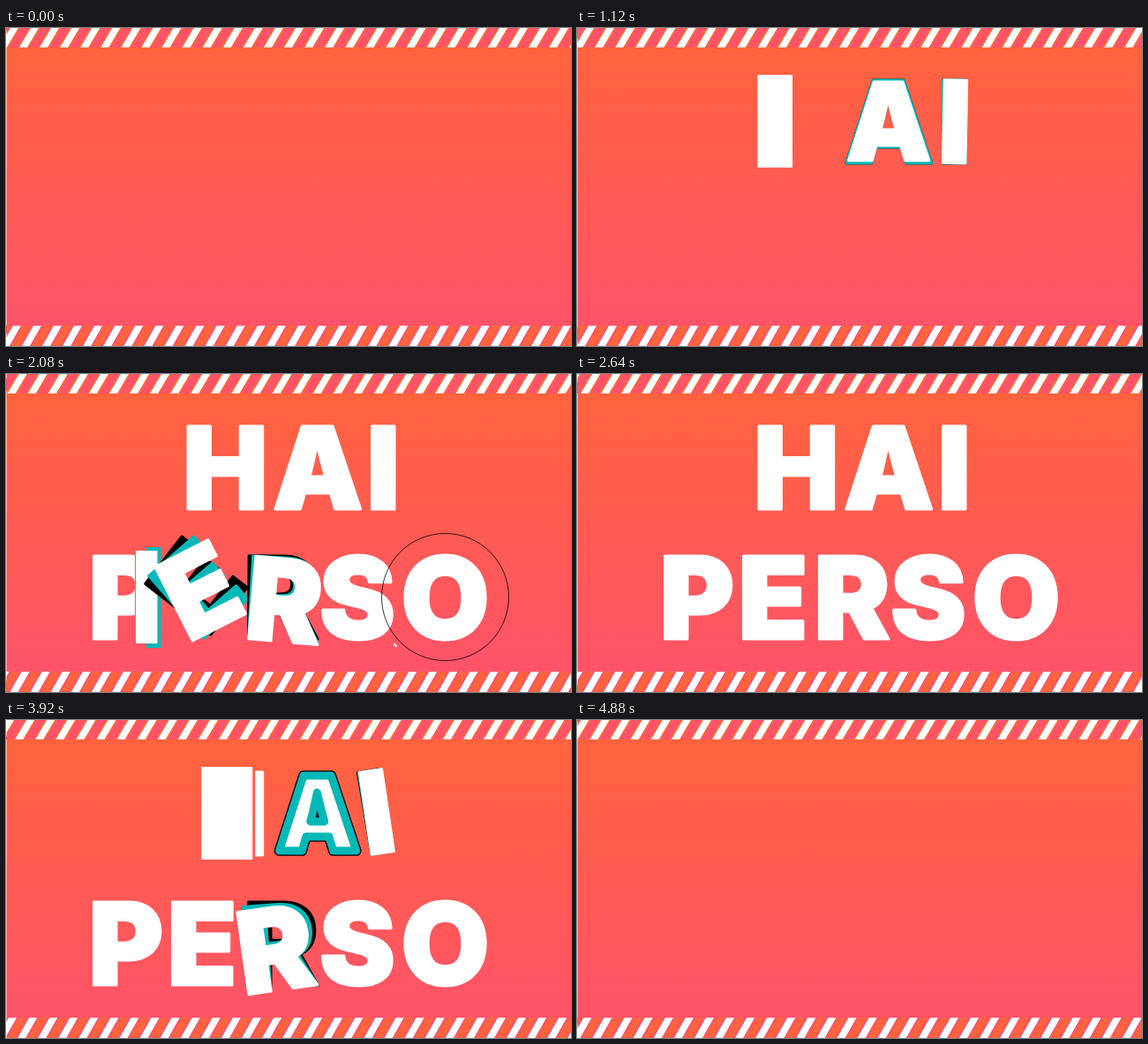
An HTML page with a canvas that plays this animation: 640 px wide and 360 px high, repeating every 4.96 s.

```html
<!DOCTYPE html>
<html lang="en">
<head>
<meta charset="utf-8">
<title>HAI PERSO</title>
<style>
  html, body { margin: 0; width: 100%; height: 100%; overflow: hidden; background: #ff5c50; }
  canvas { display: block; width: 640px; height: 360px; }
</style>
</head>
<body>
<canvas id="stage" width="640" height="360"></canvas>
<script>
const ctx = document.getElementById('stage').getContext('2d');
const LOOP = 4960, STEP = 80;
const BLACK = '#000', TEAL = '#05b8b8', WHITE = '#fff';
const ORANGE = '#ff643a', PINK = '#ff526c';
const COLORS = [BLACK, TEAL, WHITE];
const CAP = 97, EDGE = 3;

// Eased value at time t through pairs of time, value.
function key(t, ...k) {
  if (t <= k[0]) return k[1];
  for (let i = 2; i < k.length; i += 2) {
    if (t < k[i]) {
      const u = (t - k[i - 2]) / (k[i] - k[i - 2]);
      return k[i - 1] + (k[i + 1] - k[i - 1]) * u * u * (3 - 2 * u);
    }
  }
  return k[k.length - 1];
}

// x: centre, px/py: pivot from the middle of the baseline, outX: pivot on leaving,
// lag/trail: delay between layers on entering and turning,
// sway: turn per layer after its entrance, turn: turn on the main clock.
const letters = [
  { ch: 'H', x: 248.5, base: 154, start: 760, exit: 3680, wipe: true },
  { ch: 'A', x: 353, base: 154, start: 400, exit: 3840, lag: 240, py: -48, outline: true },
  { ch: 'I', x: 427.5, base: 154, start: 460, exit: 3840, lag: 120, trail: 12, px: -15, outX: -14,
    sway: [0, -22, 200, 0, 320, 5, 460, 0], turn: [3800, 0, 3880, -10, 3960, -7, 4200, 25] },
  { ch: 'P', x: 137.5, base: 301, start: 1480, exit: 4000, wipe: true },
  { ch: 'E', x: 222.5, base: 301, start: 1200, exit: 4080, lag: 160, px: -17, py: -48, unfold: true,
    turn: [1700, 0, 1920, -58, 2240, 4, 2360, 0, 4080, 0, 4400, -60] },
  { ch: 'R', x: 314, base: 301, start: 1205, exit: 3880, lag: 120, px: -42, outX: 40,
    sway: [0, -20, 200, 0, 320, 9, 520, 0],
    turn: [1960, 0, 2080, 5, 2240, 0, 3820, 0, 3920, -8, 4060, 0, 4280, 30] },
  { ch: 'S', x: 398, base: 301, start: 1560, exit: 4120, lag: 100, py: -48,
    sway: [0, -90, 260, 0], turn: [4120, 0, 4500, 90] },
  { ch: 'O', x: 497.5, base: 301, start: 1400, exit: 4180, lag: 0, py: -48, flip: true }
];

function measure(l) {
  const m = ctx.measureText(l.ch);
  l.dx = (m.actualBoundingBoxLeft - m.actualBoundingBoxRight) / 2;
  l.w = m.actualBoundingBoxRight + m.actualBoundingBoxLeft + EDGE;
}

function glyph(l, color, edge = EDGE) {
  ctx.fillStyle = ctx.strokeStyle = color;
  ctx.lineWidth = edge;
  ctx.fillText(l.ch, l.dx, -1.5);
  ctx.strokeText(l.ch, l.dx, -1.5);
}

function pose(l, t, i) {
  const enter = t - l.start - l.lag * i;
  const late = t - (l.trail || 50) * (2 - i);
  let sx = key(enter, 0, 0, 280, 1) * key(late - l.exit, 160, 1, 400, 0);
  let sy = sx;
  let turn = (l.sway ? key(enter, ...l.sway) : 0) + (l.turn ? key(late, ...l.turn) : 0);
  if (l.unfold) {
    sy = Math.sqrt(sx);
    sx *= sx;
  }
  if (l.flip) {
    const leave = t - l.exit;
    sx = key(enter, 0, 0, 120, .58, 320, 1) * key(leave, 80, 1, 400, 0);
    sy = sx * key(enter, 0, .15, 120, .34, 360, 1) * key(leave, 0, 1, 240, .4);
    turn = key(enter, 0, 40, 120, 27, 360, 0) + key(leave, 0, 0, 240, 25);
  }
  return [sx, sy, turn];
}

function drawPop(l, t) {
  const poses = COLORS.map((c, i) => pose(l, t, i));
  const px = (t > 3000 ? l.outX : l.px) || 0, py = l.py || 0;
  poses.forEach(([sx, sy, turn], i) => {
    if (sx < .01 || (i < 2 && String(poses[i]) === String(poses[2]))) return;
    ctx.save();
    ctx.translate(l.x + px, l.base + py);
    ctx.rotate(turn * Math.PI / 180);
    ctx.scale(sx, sy);
    ctx.translate(-px, -py);
    glyph(l, COLORS[i]);
    ctx.restore();
  });
}

// The letter thins to a core inside a growing teal and black rim.
function drawOutline(l, t) {
  const rim = key(t, 3800, 0, 3920, 1, 4040, 1.4);
  const size = (1 - .1 * rim) * key(t, 4000, 1, 4360, 0);
  if (size < .01) return;
  ctx.save();
  ctx.translate(l.x, l.base - CAP / 2);
  ctx.scale(size, size);
  ctx.translate(0, CAP / 2);
  glyph(l, BLACK, EDGE + 10 * rim);
  glyph(l, WHITE, 1);
  ctx.strokeStyle = TEAL;
  ctx.lineWidth = 10 * rim;
  ctx.strokeText(l.ch, l.dx, -1.5);
  ctx.restore();
}

// A slab sweeps to the right, first uncovering and later erasing the letter.
function drawWipe(l, t) {
  const leaving = t >= l.exit;
  const u = t - (leaving ? l.exit : l.start);
  if (u < 0) return;
  const from = leaving ? key(u, 0, 0, 160, 0, 240, .19, 400, 1)
                       : key(u, 0, .12, 40, .12, 320, 0, 420, 0, 600, .62, 720, 1);
  const to = leaving ? key(u, 0, 0, 240, .85, 400, 1)
                     : key(u, 0, .12, 40, .14, 320, .45, 420, .45, 600, .93, 720, 1);
  const left = l.x - l.w / 2, a = left + l.w * from, b = left + l.w * to;
  const top = l.base - 101, height = 105;
  if (leaving || u > 420) {
    ctx.save();
    ctx.beginPath();
    if (leaving) ctx.rect(b + 3, top, left + l.w - b, height);
    else ctx.rect(left - 1, top, a - left + (u >= 720 ? 2 : 0), height);
    ctx.clip();
    ctx.translate(l.x, l.base);
    glyph(l, WHITE);
    ctx.restore();
  }
  if (b - a < .5) return;
  if (!leaving && u > 420) {
    ctx.fillStyle = TEAL;
    ctx.fillRect(a + 12, top - 4, b - a - 8, height + 9);
  }
  ctx.fillStyle = WHITE;
  ctx.fillRect(a, top, b - a, height);
}

function dot(x, y, r, color) {
  ctx.fillStyle = color;
  ctx.beginPath();
  ctx.arc(x, y, r, 0, 7);
  ctx.fill();
}

function arc(x, y, r, from, to) {
  ctx.strokeStyle = BLACK;
  ctx.lineWidth = .8;
  ctx.beginPath();
  ctx.arc(x, y, r, from, to);
  ctx.stroke();
}

function dash(x, y, turn) {
  ctx.save();
  ctx.translate(x, y);
  ctx.rotate(turn);
  ctx.fillStyle = WHITE;
  ctx.fillRect(-2.5, -1, 5, 2);
  ctx.restore();
}

function drawSparks(t) {
  if (t >= 600 && t < 720) dash(411, 152, .9);
  if (t >= 1440 && t < 1680) {
    arc(400, 253, 30, key(t, 1440, 3.1, 1680, 4), key(t, 1400, 3.1, 1520, 4, 1680, 5));
    dot(385, 222, 1.3, TEAL);
    dot(394, 217, .8, '#d8435a');
    dot(399, 253, 1, WHITE);
    dot(497, 252, 1.5, BLACK);
  }
  if (t >= 1840 && t < 2240) {
    ctx.globalAlpha = key(t, 2080, 1, 2240, 0);
    arc(497.5, 252.5, key(t, 1840, 50, 2080, 72, 2240, 78), 0, 7);
    ctx.globalAlpha = 1;
  }
  if (t >= 2000 && t < 2160) dash(441, 307, .8);
}

function gradient(top, bottom) {
  const g = ctx.createLinearGradient(0, 0, 0, 360);
  g.addColorStop(0, top);
  g.addColorStop(1, bottom);
  return g;
}

function stripe(x, y, width, height, fill) {
  ctx.fillStyle = fill;
  ctx.beginPath();
  ctx.moveTo(x, y + height);
  ctx.lineTo(x + 13, y);
  ctx.lineTo(x + 13 + width, y);
  ctx.lineTo(x + width, y + height);
  ctx.fill();
}

// White stripes alternate with stripes in the reversed background gradient.
function drawBar(y, height, phase, t) {
  const gap = 23.08, shift = (phase + t / LOOP * gap) % gap;
  const reversed = gradient(PINK, ORANGE);
  for (let x = shift - 2 * gap; x < 660; x += gap) {
    stripe(x, y, 9, height, WHITE);
    stripe(x + 11.5, y, 9, height, reversed);
  }
}

function draw(t) {
  ctx.fillStyle = gradient(ORANGE, PINK);
  ctx.fillRect(0, 0, 640, 360);
  ctx.fillStyle = 'rgba(255,255,255,.5)';
  ctx.fillRect(0, 0, 1, 360);
  for (const l of letters) {
    if (l.wipe) drawWipe(l, t);
    else if (l.outline && t >= 3800) drawOutline(l, t);
    else drawPop(l, t);
  }
  drawSparks(t);
  drawBar(0, 22, 15, t);
  drawBar(337, 23, 18, t);
}

function play() {
  draw(Math.floor(performance.now() % LOOP / STEP) * STEP);
  requestAnimationFrame(play);
}

ctx.font = '900 129px Inter, sans-serif';
ctx.lineJoin = 'round';
letters.forEach(measure);
play();
</script>
</body>
</html>
```
